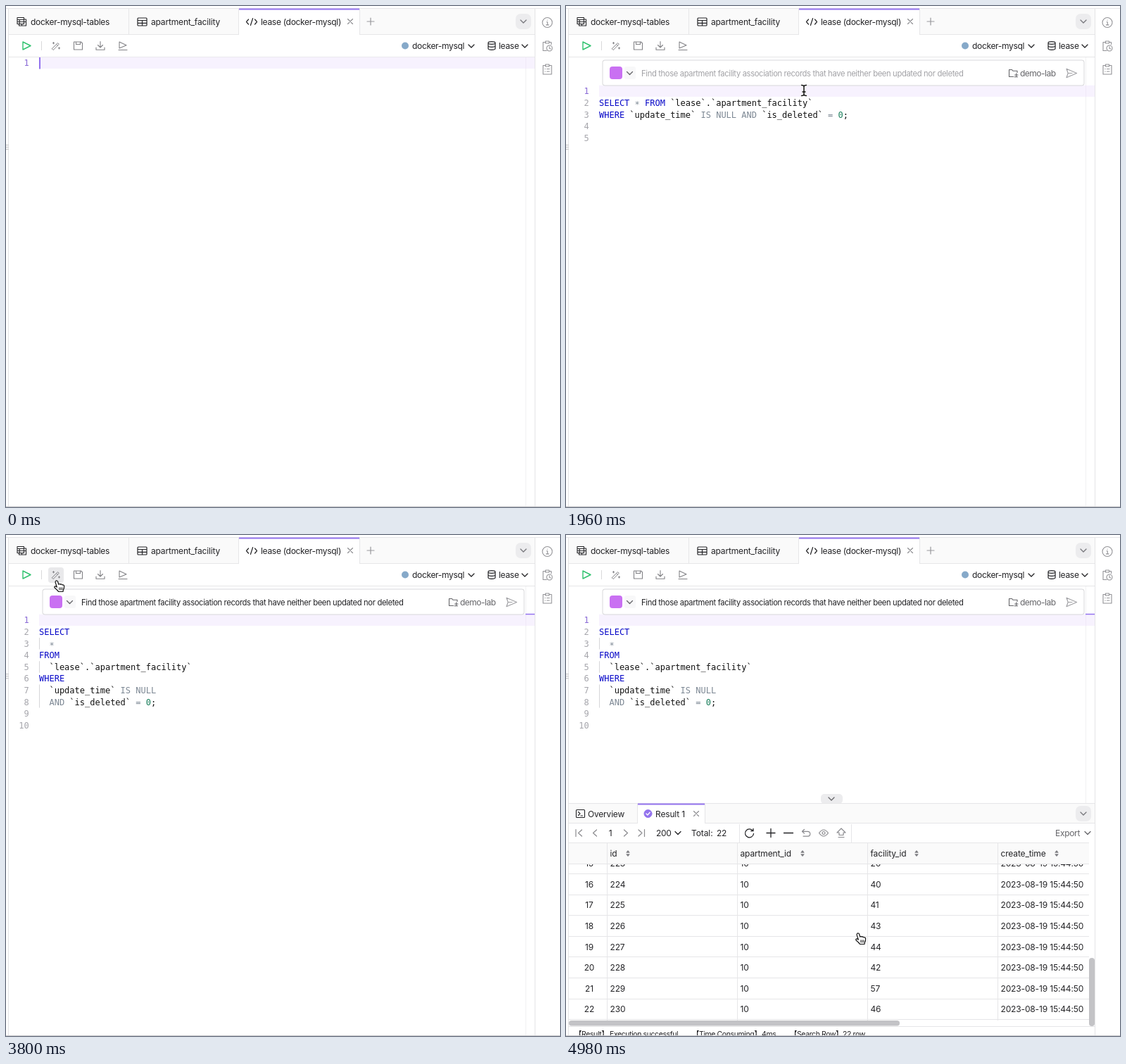
Recreate the animation shown at these times as an HTML page with a canvas. Size 787 px wide and 712 px high, loop 5.05 s.

```html
<!DOCTYPE html>
<html lang="en">
<head>
<meta charset="utf-8">
<title>SQL editor</title>
<style>
html, body { margin: 0; width: 100%; height: 100%; overflow: hidden; background: #fff; }
canvas { display: block; width: 787px; height: 712px; }
</style>
</head>
<body>
<canvas id="stage"></canvas>
<script>
const W = 787, H = 712, LOOP = 5050;
const canvas = document.getElementById('stage');
const ctx = canvas.getContext('2d');
const dpr = window.devicePixelRatio || 1;
canvas.width = W * dpr;
canvas.height = H * dpr;

const UI = 'Inter, "Noto Sans CJK SC", "Noto Sans", sans-serif';
const MONO = '"DejaVu Sans Mono", monospace';
const INK = '#232326', GRAY = '#8a8a8e', TOOL = '#828286', LINE = '#e6e6e8', PURPLE = '#9373ee';
const CHAR = 7.224, LEFT = 47, LEAD = 16.6;

const PROMPT = 'Find those apartment facility association records that have neither been updated nor deleted';
const SELECT_LINE = 'SELECT * FROM `lease`.`apartment_facility`';
const WHERE_LINE = 'WHERE `update_time` IS NULL AND `is_deleted` = 0;';
const PRETTY = ['', 'SELECT', '  *', 'FROM', '  `lease`.`apartment_facility`', 'WHERE',
  '  `update_time` IS NULL', '  AND `is_deleted` = 0;', '', ''];
const FACILITIES = [24, 25, 26, 40, 41, 42, 43, 44, 45, 46, 57, 58, 24, 25, 26, 40, 41, 43, 44, 42, 57, 46];

// Pointer stops: time, x, y
const STOPS = [
  [1940, 338, 118], [1960, 338, 120], [2180, 341, 130], [2480, 423, 157], [2700, 423, 157],
  [2800, 402, 156], [3060, 61, 149], [3220, 49, 124], [3420, 49, 124], [3640, 68, 64],
  [3940, 68, 64], [4100, 25, 57], [4520, 25, 57], [4740, 411, 565], [LOOP, 411, 565]
];

const clamp = v => Math.max(0, Math.min(1, v));
const span = (t, a, b) => clamp((t - a) / (b - a));
const smooth = p => p * p * (3 - 2 * p);

function rect(x, y, w, h, color, r = 0) {
  ctx.fillStyle = color;
  ctx.beginPath();
  ctx.roundRect(x, y, w, h, r);
  ctx.fill();
}
const hline = (x1, x2, y, color = LINE) => rect(x1, y, x2 - x1, 1, color);
const vline = (x, y1, y2, color = LINE) => rect(x, y1, 1, y2 - y1, color);

function icon(d, x, y, color = GRAY, width = 1.2, fill) {
  const path = new Path2D(d);
  ctx.save();
  ctx.translate(x, y);
  ctx.lineWidth = width;
  ctx.lineJoin = ctx.lineCap = 'round';
  if (fill) { ctx.fillStyle = fill; ctx.fill(path); }
  ctx.strokeStyle = color;
  ctx.stroke(path);
  ctx.restore();
}

function label(text, x, y, { size = 12, color = INK, gap = -0.3, align = 'left' } = {}) {
  ctx.font = `${size}px ${UI}`;
  ctx.letterSpacing = gap + 'px';
  ctx.textAlign = align;
  ctx.fillStyle = color;
  ctx.fillText(text, x, y);
  const width = ctx.measureText(text).width;
  ctx.letterSpacing = '0px';
  return width;
}

function mono(text, x, y, color, align = 'left') {
  ctx.font = `12px ${MONO}`;
  ctx.textAlign = align;
  ctx.fillStyle = color;
  ctx.fillText(text, x, y);
}

const chevron = (x, y, color = INK, s = 4) => icon(`M${-s} ${-s / 2}L0 ${s / 2}L${s} ${-s / 2}`, x, y, color, 1.3);
const cross = (x, y) => icon('M-3.5 -3.5L3.5 3.5M3.5 -3.5L-3.5 3.5', x, y, GRAY, 1.1);

function roundButton(x, y) {
  rect(x - 11, y - 11, 22, 22, '#ececee', 7);
  chevron(x, y, '#77777c');
}

function drawTabs() {
  rect(4, 4, 747, 36, '#fafafa');
  hline(0, W, 3);
  hline(4, 751, 40);
  for (const x of [174, 330, 502]) vline(x, 4, 40);
  rect(331, 4, 171, 37, '#fff');
  rect(331, 3.5, 171, 2, PURPLE);

  icon('M-6 -5.5H3.5V3.5H-6ZM-6 -2.5H3.5M-6 .5H3.5M-2.8 -2.5V3.5M3.5 -3H6.5V6H-3.5V3.5M3.5 .5H6.5M.5 3.5V6', 22, 22, INK, 1.1);
  label('docker-mysql-tables', 35, 27);
  icon('M-5.5 -5.5H5.5Q6.5 -5.5 6.5 -4.5V4.5Q6.5 5.5 5.5 5.5H-5.5Q-6.5 5.5 -6.5 4.5V-4.5Q-6.5 -5.5 -5.5 -5.5ZM-6.5 -2H6.5M-6.5 1.8H6.5M0 -2V5.5', 193.5, 22.5, INK);
  label('apartment_facility', 206, 27, { gap: -0.17 });
  icon('M-4.5 -3.5L-7.5 0L-4.5 3.5M4.5 -3.5L7.5 0L4.5 3.5M1.6 -5L-1.6 5', 349, 22.5, INK);
  label('lease (docker-mysql)', 362, 27, { gap: -0.3 });
  cross(489, 22);
  icon('M-5 0H5M0 -5V5', 518, 22, '#98989c');
  roundButton(735, 22);
}

function drawToolbar(hover) {
  hline(4, 751, 72);
  if (hover === 'wand') rect(60, 46, 22, 22, '#e9e9eb', 4);
  if (hover === 'run') rect(19, 46, 22, 22, '#e9e9eb', 4);
  icon('M-5 -5.5L6 0L-5 5.5Z', 29, 56.5, '#2fc26e', 1.4);
  vline(50, 50, 63, '#d8d8da');
  icon('M-5.5 4L2.5 -4L4.3 -2.2L-3.7 5.8ZM.5 -2L2.3 -.2M-3.5 -5V-2.6M-4.7 -3.8H-2.3M4.5 2.2V4.6M3.3 3.4H5.7', 71, 56.5, TOOL, 1);
  icon('M-6 -5.5H4L6 -3.5V5.5H-6ZM-3 -5.5V-2H3V-5.5', 102.5, 56.5, TOOL, 1.1);
  icon('M0 -6V2.5M-3.5 -1L0 2.5L3.5 -1M-6 2.5V5.8H6V2.5', 134, 56.5, TOOL, 1.1);
  icon('M-5 -5.5L5 -.8L-5 3.6ZM-6 6H6', 166, 56.5, TOOL, 1.1);

  ctx.fillStyle = '#86a9c9';
  ctx.beginPath();
  ctx.arc(567, 56.5, 5, 0, 7);
  ctx.fill();
  label('docker-mysql', 577, 61, { gap: -0.33 });
  chevron(661, 57);
  icon('M-5 -4C-5 -6.4 5 -6.4 5 -4C5 -1.6 -5 -1.6 -5 -4V4C-5 6.4 5 6.4 5 4V-4M-5 0C-5 2.4 5 2.4 5 0', 690, 56.5, INK);
  label('lease', 700, 61);
  chevron(737, 57);
}

function drawFrame() {
  vline(3, 4, H, '#e4e4e6');
  vline(751, 4, H, '#e4e4e6');
  vline(738, 73, H, '#f1f1f3');
  for (const y of [197, 200, 203]) {
    rect(0, y, 1, 1.2, '#a5a5a8');
    rect(2, y, 1, 1.2, '#a5a5a8');
  }
  icon('M7 0A7 7 0 1 1 -7 0A7 7 0 1 1 7 0M-1 -.8H.3V3.4M-1.6 3.4H2M0 -3.5V-3.2', 769, 23.5, '#929296', 1.1);
  icon('M-2.5 -5.5H-6V6.5H-1M2.5 -5.5H5.5V-2.5M-2.5 -7H2.5V-4H-2.5ZM7 3A4 4 0 1 1 -1 3A4 4 0 1 1 7 3M3 .8V3.2L4.8 4', 769, 57, '#929296', 1.1);
  icon('M-2.5 -5.5H-6V7H6V-5.5H2.5M-2.5 -7H2.5V-4H-2.5ZM-3.2 -.5H-2.8M-.5 -.5H3M-3.2 3H-2.8M-.5 3H3', 769, 90, '#929296', 1.1);
  hline(0, W, 711, '#c9c9cc');
}

function drawPrompt(t) {
  if (t < 60) return;
  ctx.save();
  ctx.globalAlpha = span(t, 20, 260);
  rect(51.5, 76.5, 685, 37, '#d8d8db', 4);
  rect(52.5, 77.5, 683, 35, '#fff', 3);
  rect(62, 86, 18, 18, '#c970f2', 4);
  rect(83, 86, 16, 18, '#f8f8f9', 3);
  chevron(90.5, 95.5, '#66666a');
  icon('M0 5H-6V-5H-2L-.5 -3.2H5.5V-1M2 2.5H6.5M4.3 .3V4.8M1.5 5.2H6', 635.5, 95.5, '#66666a', 1.1);
  label('demo-lab', 645, 100, { color: '#66666a', gap: -0.5 });
  icon('M-7 -6.2L7.5 0L-7 6.2L-4.8 0ZM-4.8 0H1', 718, 95.5, '#a0a0a4', 1.2);

  const step = t < 560 ? 0 : Math.min(10, Math.floor((t - 560) / 33) + 1);
  const typed = PROMPT.slice(0, Math.round(PROMPT.length * step / 10));
  const busy = t >= 1140 && t < 2120;
  const width = label(typed, 107, 99.5, { size: 11.2, gap: -0.34, color: busy ? '#a2a2a6' : INK });
  if (t >= 260 && t < 1140) vline(107 + width, 88, 103, '#111');
  ctx.restore();
}

function codeLines(t) {
  if (t >= 3700) return PRETTY;
  if (t >= 1920) return ['', SELECT_LINE, WHERE_LINE, '', ''];
  const part = (s, a, b) => s.slice(0, Math.round(s.length * span(t, a, b)));
  const lines = [''];
  if (t >= 1200) lines.push(part(SELECT_LINE, 1180, 1620));
  if (t >= 1660) lines.push(part(WHERE_LINE, 1640, 1900));
  return lines;
}

function tokenColor(token) {
  if (/^(SELECT|FROM|WHERE)$/.test(token)) return '#0808c8';
  if (/^(IS|NULL|AND|\*|=)$/.test(token)) return '#7d8894';
  if (/^\d/.test(token)) return '#1b7f5c';
  return '#111';
}

function drawCodeLine(text, y) {
  for (const m of text.matchAll(/`[^`]*`|\w+|[^\s\w`]|`\w*/g)) {
    const drop = m[0] === '*' ? 2 : 0; // centre the star on the line
    mono(m[0], LEFT + m.index * CHAR, y + drop, tokenColor(m[0]));
  }
}

function drawSelection(lines, from, top) {
  for (let i = from.line; i < 3; i++) {
    const start = i === from.line ? from.col : 0;
    const end = lines[i].length + (i < 2 ? 1 : 0);
    rect(LEFT + start * CHAR, top(i), Math.max(0, end - start) * CHAR, LEAD, '#e1d4fb');
    for (let c = start; c < lines[i].length; c++)
      if (lines[i][c] === ' ') mono('·', LEFT + c * CHAR, top(i) + 12.6, '#b2a2cf');
  }
}

function drawEditor(t) {
  const open = t >= 60;
  const top = i => (open ? 112.8 : 72.8) + i * LEAD;
  const lines = codeLines(t);
  const selecting = t >= 2820 && t < 3700;
  let active = 0;
  if (selecting) {
    const p = pointerAt(Math.min(t, 3220));
    const line = Math.max(0, Math.min(2, Math.floor((p.y - 112.7) / LEAD)));
    const col = Math.max(0, Math.min(lines[line].length, Math.round((p.x - LEFT) / CHAR)));
    active = line;
    drawSelection(lines, { line, col }, top);
  } else {
    rect(LEFT, top(0), 751 - LEFT, LEAD - 0.4, '#f7f2fe');
    vline(738, top(0), top(1), '#efe9f7');
  }
  if (!open) rect(LEFT, 73, 2, 16.4, PURPLE);
  if (t >= 2820) rect(738, top(active) - 1, 13, 1.5, PURPLE);

  lines.forEach((text, i) => {
    const base = top(i) + 12.6;
    mono(i + 1, 32.6, base, i === active ? '#8a6bd6' : '#a6a6ac', 'right');
    if (text.startsWith(' ')) vline(LEFT, top(i), top(i + 1), '#d5d5d8');
    drawCodeLine(text, base);
  });
}

function drawSorter(x) {
  icon('M-2 -1.5L0 -4L2 -1.5Z', x, 452.5, '#77777b', 0.8, '#77777b');
  icon('M-2 1.5L0 4L2 1.5Z', x, 452.5, '#77777b', 0.8, '#77777b');
}

function drawTable(scroll) {
  const columns = [['id', 58, 88], ['apartment_id', 243, 336], ['facility_id', 428, 498], ['create_time', 613, 697]];
  const rowH = 29.55;
  const cell = { gap: -0.15 };
  rect(4, 438, 739, 29, '#fafafa');
  hline(4, 743, 437);
  hline(4, 743, 467);
  for (const [name, x, sorter] of columns) {
    label(name, x + 4.5, 457, cell);
    drawSorter(sorter);
  }

  ctx.save();
  ctx.beginPath();
  ctx.rect(4, 468, 739, 222);
  ctx.clip();
  FACILITIES.forEach((facility, i) => {
    const y = 467 + i * rowH - scroll;
    if (y < 430 || y > 700) return;
    const late = i >= 12;
    const base = y + 19.6;
    label(String(i + 1), 33, base, { ...cell, align: 'center' });
    const values = [209 + i, late ? 10 : 9, facility, '2023-08-19 15:44:' + (late ? 50 : 26)];
    values.forEach((v, k) => label(String(v), columns[k][1] + 4.5, base, cell));
    hline(4, 743, Math.round(y + rowH));
  });
  ctx.restore();
  for (const [, x] of columns) vline(x, 438, 690);

  rect(4, 690, 470, 7.5, '#c3c3c6', 3.75);
  rect(743, 438 + 163 * scroll / 429, 8, 97, '#c3c3c6', 4);
}

function drawStatus() {
  const parts = [['Result', 22, 55], ['Time Consuming', 189, 270], ['Search Row', 328, 384]];
  const values = [['Execution successful.', 62], ['4ms.', 278], ['22 row', 393]];
  const style = { size: 10.5, gap: -0.4 };
  hline(4, 751, 698);
  ctx.save();
  ctx.beginPath();
  ctx.rect(4, 699, 747, 12);
  ctx.clip();
  for (const [text, x] of parts) {
    label('【', x, 713, { ...style, align: 'right' });
    const width = label(text, x, 713, style);
    label('】', x + width, 713, style);
  }
  for (const [text, x] of values) label(text, x, 713, style);
  ctx.restore();
}

function drawResults(t) {
  if (t < 4240) return;
  rect(4, 381, 747, 330, '#fff');
  rect(362, 368, 31, 14, '#ececee', 5);
  chevron(377, 375, '#66666a');
  rect(4, 382, 747, 27, '#fafafa');
  hline(4, 751, 381);
  hline(4, 751, 409);
  vline(101, 382, 409);
  vline(197, 382, 409);
  rect(102, 382, 95, 28, '#fff');
  rect(102, 381.5, 95, 2, PURPLE);
  icon('M-5 -5.5H5Q6 -5.5 6 -4.5V4.5Q6 5.5 5 5.5H-5Q-6 5.5 -6 4.5V-4.5Q-6 -5.5 -5 -5.5ZM-3 -2.5L-.5 0L-3 2.5M.5 3H3', 20.5, 396, INK, 1.1);
  label('Overview', 31, 400.5, { gap: -0.2 });
  icon('M5.5 0A5.5 5.5 0 1 1 -5.5 0A5.5 5.5 0 1 1 5.5 0', 116.5, 396, PURPLE, 1, PURPLE);
  icon('M-2.5 0L-.6 2L2.6 -1.8', 116.5, 396, '#fff', 1.4);
  label('Result 1', 127, 400.5, { gap: -0.15 });
  cross(185, 396);
  roundButton(735, 396);

  icon('M-4 -5V5M4.5 -4.5L-.5 0L4.5 4.5', 18, 423.5);
  icon('M2.5 -4.5L-2.5 0L2.5 4.5', 41, 423.5);
  label('1', 63, 428, { align: 'center' });
  icon('M-2.5 -4.5L2.5 0L-2.5 4.5', 85, 423.5);
  icon('M4 -5V5M-4.5 -4.5L.5 0L-4.5 4.5', 107.5, 423.5);
  label('200', 128, 428);
  chevron(159, 423.5);
  label('Total:', 178, 428, { gap: -0.1 });
  label('22', 214, 428);
  vline(246, 411, 437);
  icon('M5 -3A6 6 0 1 0 6 1M5.5 -6V-2.8H2.3', 260.5, 423.5, INK, 1.3);
  icon('M-6 0H6M0 -6V6', 291, 423.5, INK, 1.3);
  icon('M-6.5 0H6.5', 316, 423.5, INK, 1.3);
  icon('M-2.5 -5L-5.5 -2.2L-2.5 .6M-5.5 -2.2H2.5Q5.8 -2 5.8 1.3Q5.8 4.6 2.5 4.6H-4', 341, 423.5);
  icon('M-6.5 0Q0 -9 6.5 0Q0 9 -6.5 0ZM2 0A2 2 0 1 1 -2 0A2 2 0 1 1 2 0', 366, 423.5);
  icon('M0 -6.5L6 -.5H3V3H-3V-.5H-6ZM-4 6H4', 391, 423.5);
  vline(405, 411, 437);
  label('Export', 695, 428, { color: '#66666a' });
  chevron(741, 423.5, '#66666a');

  const steps = t < 4860 ? 0 : Math.min(7, (t - 4860) / 20 + 1);
  const p = steps / 7;
  drawTable(429 * p * (1.4 - 0.4 * p));
  drawStatus();
}

function pointerAt(t) {
  let i = 0;
  while (i < STOPS.length - 2 && t >= STOPS[i + 1][0]) i++;
  const [t0, x0, y0] = STOPS[i], [t1, x1, y1] = STOPS[i + 1];
  const p = smooth(span(t, t0, t1));
  return { x: x0 + (x1 - x0) * p, y: y0 + (y1 - y0) * p };
}

function drawPointer(t) {
  if (t < 1940) return;
  const { x, y } = pointerAt(t);
  if (t < 3520) {
    const beam = 'M-3.5 -7.5Q0 -7.5 0 -5.5Q0 -7.5 3.5 -7.5M0 -5.5V5.5M-3.5 7.5Q0 7.5 0 5.5Q0 7.5 3.5 7.5M-2 2H2';
    icon(beam, x, y, '#fff', 3);
    icon(beam, x, y, '#111', 1.5);
    return;
  }
  icon('M2.5 1.6C3.6 .4 5.2 1 5.6 2.3L6.8 6.2C7.4 5.2 9 5.3 9.4 6.4C10.2 5.6 11.7 5.9 12 7C13.2 6.4 14.5 7.2 14.6 8.5C14.8 10.6 14.4 12.4 13.4 14L13 16.5H6.5C5.6 14.8 3 12.6 1.2 11C.2 10 1 8.6 2.3 8.8C3 8.9 3.6 9.4 4.3 10L2.2 3.6C2 2.8 2 2.1 2.5 1.6Z', x, y, '#111', 1.2, '#fff');
  icon('M7.8 10.8V14M9.8 10.8V14M11.8 10.8V14', x, y, '#111', 0.9);
}

function draw(t) {
  const hover = t >= 3600 && t < 4000 ? 'wand' : t >= 4080 && t < 4540 ? 'run' : '';
  ctx.setTransform(dpr, 0, 0, dpr, 0, 0);
  rect(0, 0, W, H, '#fff');
  drawFrame();
  drawTabs();
  drawToolbar(hover);
  drawEditor(t);
  drawPrompt(t);
  drawResults(t);
  drawPointer(t);
}

const begin = performance.now();
function tick() {
  const t = (performance.now() - begin) % LOOP;
  draw(Math.floor(t / 20) * 20);
  requestAnimationFrame(tick);
}
tick();
</script>
</body>
</html>
```
